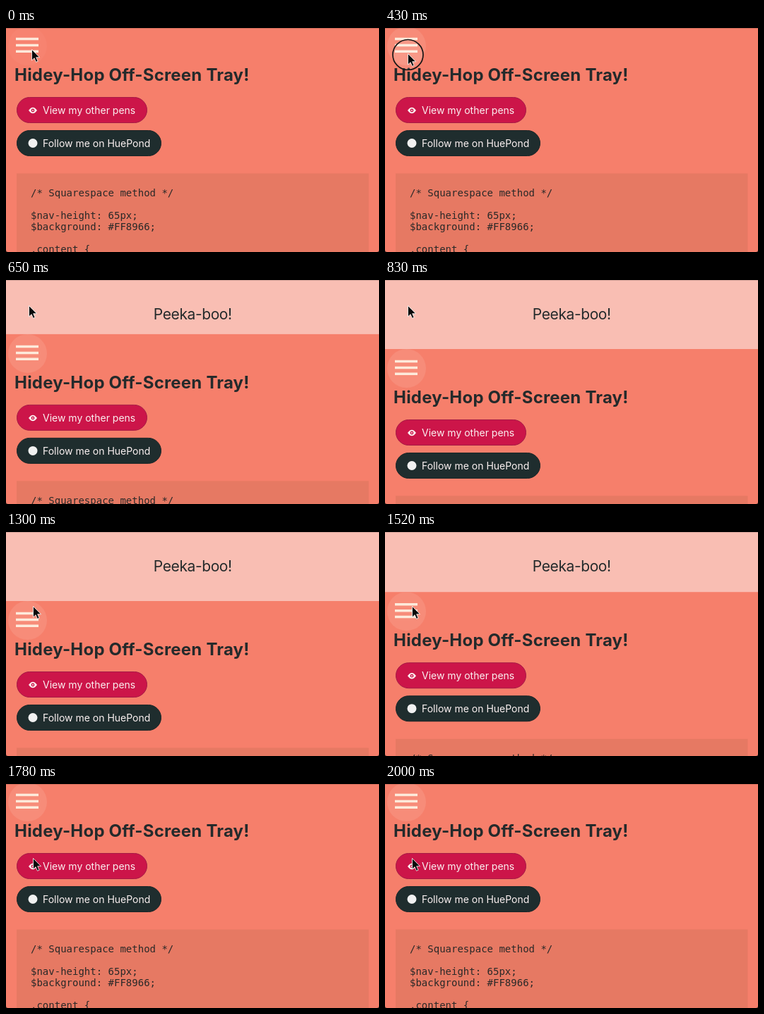
Recreate the animation shown at these times as an HTML page. Size 528 by 318 pixels, loop 2040 ms.

```html
<!DOCTYPE html>
<html lang="en">
<head>
<meta charset="utf-8">
<title>Sliding menu</title>
<style>
  html, body { margin: 0; width: 100%; height: 100%; overflow: hidden; background: #f67f6b; }
  svg { display: block; width: 528px; height: 318px; }
  text { font-family: Inter, sans-serif; fill: #242a2b; white-space: pre; }
  .title { font-size: 24px; font-weight: 700; letter-spacing: .2px; }
  .button { font-size: 14px; fill: #fbf1f1; }
  .hello { font-size: 21px; letter-spacing: -.4px; text-anchor: middle; }
  .code text { font: 14px "DejaVu Sans Mono", monospace; fill: #2a2928; }
</style>
</head>
<body>
<svg viewBox="0 0 528 318">
  <rect width="528" height="318" fill="#f9beb3"/>
  <text class="hello" x="264.3" y="55.5">Peeka-boo!</text>

  <g id="page">
    <rect y="-2" width="528" height="330" fill="#f67f6b"/>
    <circle id="halo" cx="30.5" cy="25.5" r="27.5" fill="#f78c79"/>
    <path d="M14 15.5h32M14 24.5h32M14 33.3h32" stroke="#fdeadb" stroke-width="3.5"/>
    <text class="title" x="12" y="75">Hidey-Hop Off-Screen Tray!</text>

    <rect x="15.5" y="98.5" width="184" height="36" rx="18" fill="#cc1549" stroke="#a51a45"/>
    <path d="M32 117Q38 108.5 44 117Q38 125.5 32 117Z" fill="#fbf1f1"/>
    <circle cx="38" cy="117" r="2.4" fill="#cc1549"/>
    <circle cx="38" cy="117" r="1" fill="#fbf1f1"/>
    <text class="button" x="52" y="122">View my other pens</text>

    <rect x="15.5" y="145.5" width="204" height="36" rx="18" fill="#1f2d2e" stroke="#1b2627"/>
    <circle cx="38" cy="163.5" r="6.5" fill="#f1f1f1"/>
    <text class="button" x="52" y="169">Follow me on HuePond</text>

    <g class="code">
      <rect x="15" y="206.5" width="498.5" height="130" fill="#e67963"/>
      <text x="35" y="239">/* Squarespace method */</text>
      <text x="35" y="271">$nav-height: 65px;</text>
      <text x="35" y="287">$background: #FF8966;</text>
      <text x="35" y="319">.content {</text>
    </g>
  </g>

  <path d="M0 .5H528" stroke="#000" stroke-opacity=".16"/>
  <path d="M0 315v3h3Q0 318 0 315ZM528 315v3h-3Q528 318 528 315Z" fill="#3a2522"/>

  <circle id="ring" fill="#fff" fill-opacity=".1" stroke="#161616" stroke-width="1.7"/>
  <path id="cursor" d="M0 0V15.5L3.6 12.2L6 17.8L8.6 16.7L6.2 11.2H11Z"
        fill="#080808" stroke="#fff" stroke-width=".8"/>
</svg>
<script>
const LOOP = 2040;
const [page, halo, ring, cursor] =
  ["page", "halo", "ring", "cursor"].map(id => document.getElementById(id));

const clamp = x => Math.min(1, Math.max(0, x));
const span = (t, start, length) => clamp((t - start) / length);
const smooth = x => x * x * (3 - 2 * x);
const bezier = (s, a, b) => 3 * s * (1 - s) ** 2 * a + 3 * s * s * (1 - s) * b + s ** 3;

// CSS "ease"
function ease(x) {
  let low = 0, high = 1;
  for (let i = 0; i < 20; i++) {
    const mid = (low + high) / 2;
    if (bezier(mid, .25, .25) < x) low = mid; else high = mid;
  }
  return bezier(low, .1, 1);
}

function drawRing(t, x, y) {
  const clicks = [390, 1385];
  const start = clicks.find(c => t >= c && t < c + 110);
  ring.style.display = start === undefined ? "none" : "";
  if (start === undefined) return;
  const p = (t - start) / 110;
  ring.setAttribute("cx", x);
  ring.setAttribute("cy", y + 1.5);
  ring.setAttribute("r", 20 + 4 * p);
  ring.setAttribute("opacity", 1 - span(p, .5, .5));
}

function draw(t) {
  const shift = 100 * (ease(span(t, 505, 300)) - ease(span(t, 1485, 300)));
  page.setAttribute("transform", `translate(0 ${shift.toFixed(2)})`);
  halo.setAttribute("opacity", .35 + .65 * span(t, 0, 200));

  const settle = smooth(span(t, 0, 250));
  const travel = smooth(span(t, 920, 330));
  const x = 36.5 - 4 * settle + 6 * travel;
  const y = 30.5 + 6 * settle + 69 * travel;
  cursor.setAttribute("transform", `translate(${x} ${y})`);
  drawRing(t, x, y);
}

const begin = performance.now();
function tick() {
  draw((performance.now() - begin) % LOOP);
  requestAnimationFrame(tick);
}
tick();
</script>
</body>
</html>
```
